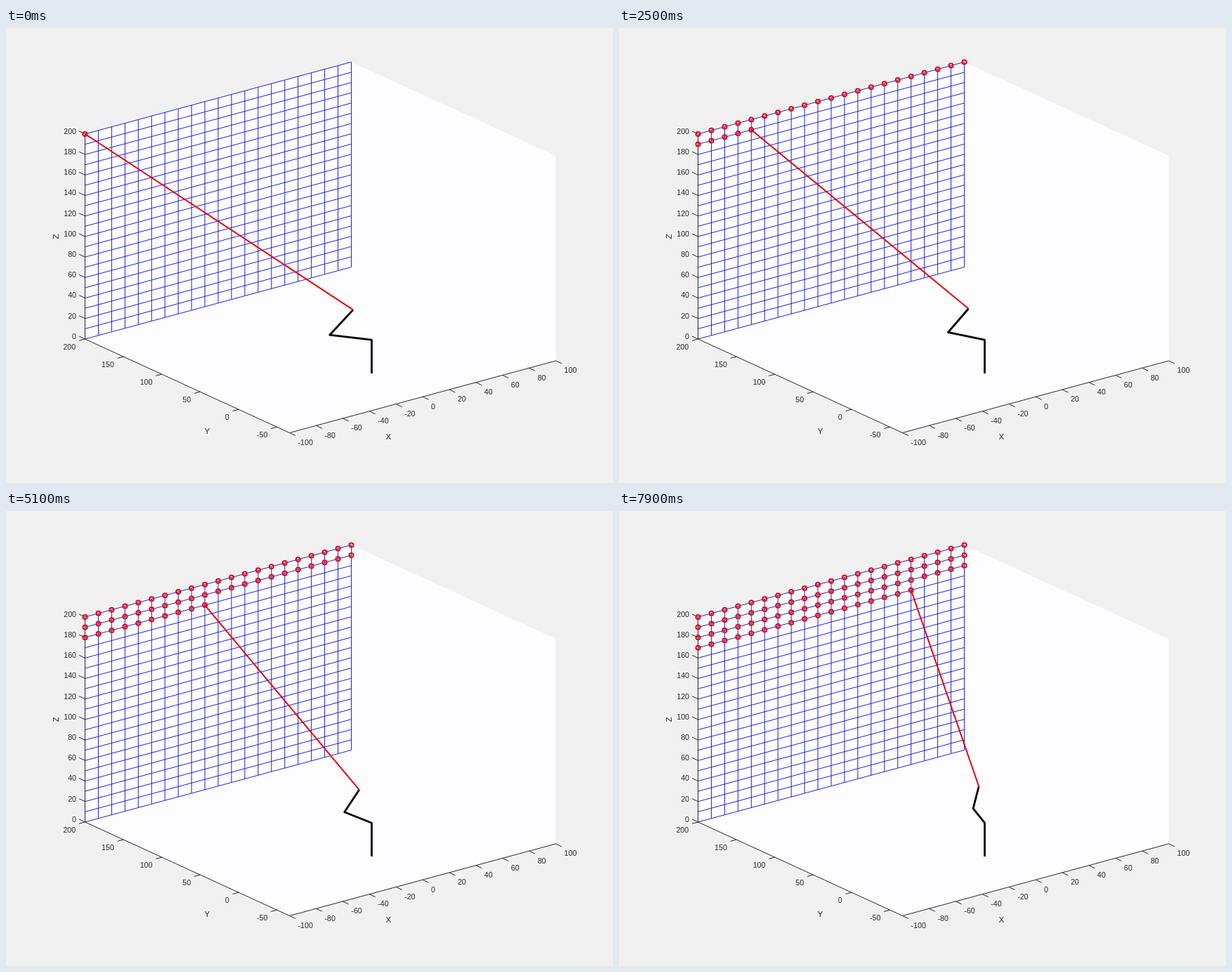
An HTML page with a canvas for the animation above (8000 ms loop, 864x648 px).

```html
<!DOCTYPE html>
<html>
<head>
<meta charset="utf-8">
<style>
html, body { margin: 0; width: 100%; height: 100%; overflow: hidden; background: #f0f0f0; }
canvas { display: block; }
</style>
</head>
<body>
<canvas id="stage" width="864" height="648"></canvas>
<script>
const ctx = document.getElementById('stage').getContext('2d');
const LOOP = 8000, STEP = 100, COLS = 21;
const LINK = 32.7, WALL = 200, Y_MIN = -66.4;
const INK = '#262626', BLUE = '#2020d0', RED = '#e8000a';

// Orthographic projection of plot coordinates to pixels
const project = (x, y, z) => [
  520.5 + 1.895 * x - 1.0925 * y,
  491.95 - 0.5125 * x - 0.5011 * y - 1.46 * z
];

function path(points, color, width) {
  ctx.beginPath();
  points.forEach(p => ctx.lineTo(...p));
  ctx.strokeStyle = color;
  ctx.lineWidth = width;
  ctx.stroke();
}

function label(text, x, y, align, size = 10.67) {
  ctx.font = `${size}px "Liberation Sans", Arial, sans-serif`;
  ctx.textAlign = align;
  ctx.textBaseline = 'alphabetic';
  ctx.fillStyle = INK;
  ctx.fillText(text, x, y + size * 0.36);
}

function tick([x, y], dx, dy, value, lx, ly, align) {
  path([[x, y], [x + dx, y + dy]], INK, 1);
  label(value, x + lx, y + ly, align);
}

function drawAxes() {
  ctx.fillStyle = '#f0f0f0';
  ctx.fillRect(0, 0, 864, 648);

  ctx.beginPath();
  [[-100, WALL, 200], [100, WALL, 200], [100, Y_MIN, 200],
   [100, Y_MIN, 0], [-100, Y_MIN, 0], [-100, WALL, 0]]
    .forEach(p => ctx.lineTo(...project(...p)));
  ctx.fillStyle = '#fdfdff';
  ctx.fill();

  path([project(-100, WALL, 0), project(-100, Y_MIN, 0), project(100, Y_MIN, 0)], INK, 1);
  for (let v = -100; v <= 100; v += 20)
    tick(project(v, Y_MIN, 0), 8.5, 4, v, 12, 13.5, 'left');
  for (let v = -50; v <= 200; v += 50)
    tick(project(-100, v, 0), -8.5, 2.3, v, -13.3, 11.3, 'right');
  for (let v = 0; v <= 200; v += 20)
    tick(project(-100, WALL, v), -8.5, -4, v, -12.5, -4, 'right');

  label('X', 544.5, 581.5, 'center', 11.7);
  label('Y', 286.5, 574, 'center', 11.7);
  ctx.save();
  ctx.translate(71, 297);
  ctx.rotate(-Math.PI / 2);
  label('Z', 0, 0, 'center', 11.7);
  ctx.restore();
}

function drawGrid() {
  for (let i = 0; i < COLS; i++) {
    const x = -100 + 10 * i, z = 10 * i;
    path([project(x, WALL, 0), project(x, WALL, 200)], BLUE, 1);
    path([project(-100, WALL, z), project(100, WALL, z)], BLUE, 1);
  }
  path([project(-100, WALL, 0), project(-100, WALL, 200)], 'rgba(38,38,38,.7)', 1);
}

const target = n => [-100 + 10 * (n % COLS), WALL, 200 - 10 * Math.floor(n / COLS)];

function drawMarker(point) {
  ctx.beginPath();
  ctx.arc(...project(...point), 3, 0, 2 * Math.PI);
  ctx.strokeStyle = RED;
  ctx.lineWidth = 2;
  ctx.stroke();
}

function drawArm([x, y, z]) {
  const reach = Math.hypot(x, y);
  const joint = (h, v) => project(h * x / reach, h * y / reach, v);
  // The last link stays perpendicular to the beam
  const dh = reach - LINK, dv = z - LINK;
  const angle = Math.atan2(dv, dh) + Math.acos(LINK / Math.hypot(dh, dv));
  const wrist = joint(LINK + LINK * Math.cos(angle), LINK + LINK * Math.sin(angle));
  path([joint(0, 0), joint(0, LINK), joint(LINK, LINK), wrist], '#000', 2.8);
  path([wrist, project(x, y, z)], RED, 2);
}

function frame(now) {
  const n = Math.floor(now % LOOP / STEP);
  drawAxes();
  drawGrid();
  for (let i = 0; i <= n; i++) drawMarker(target(i));
  drawArm(target(n));
  requestAnimationFrame(frame);
}

ctx.lineJoin = 'round';
requestAnimationFrame(frame);
</script>
</body>
</html>
```
